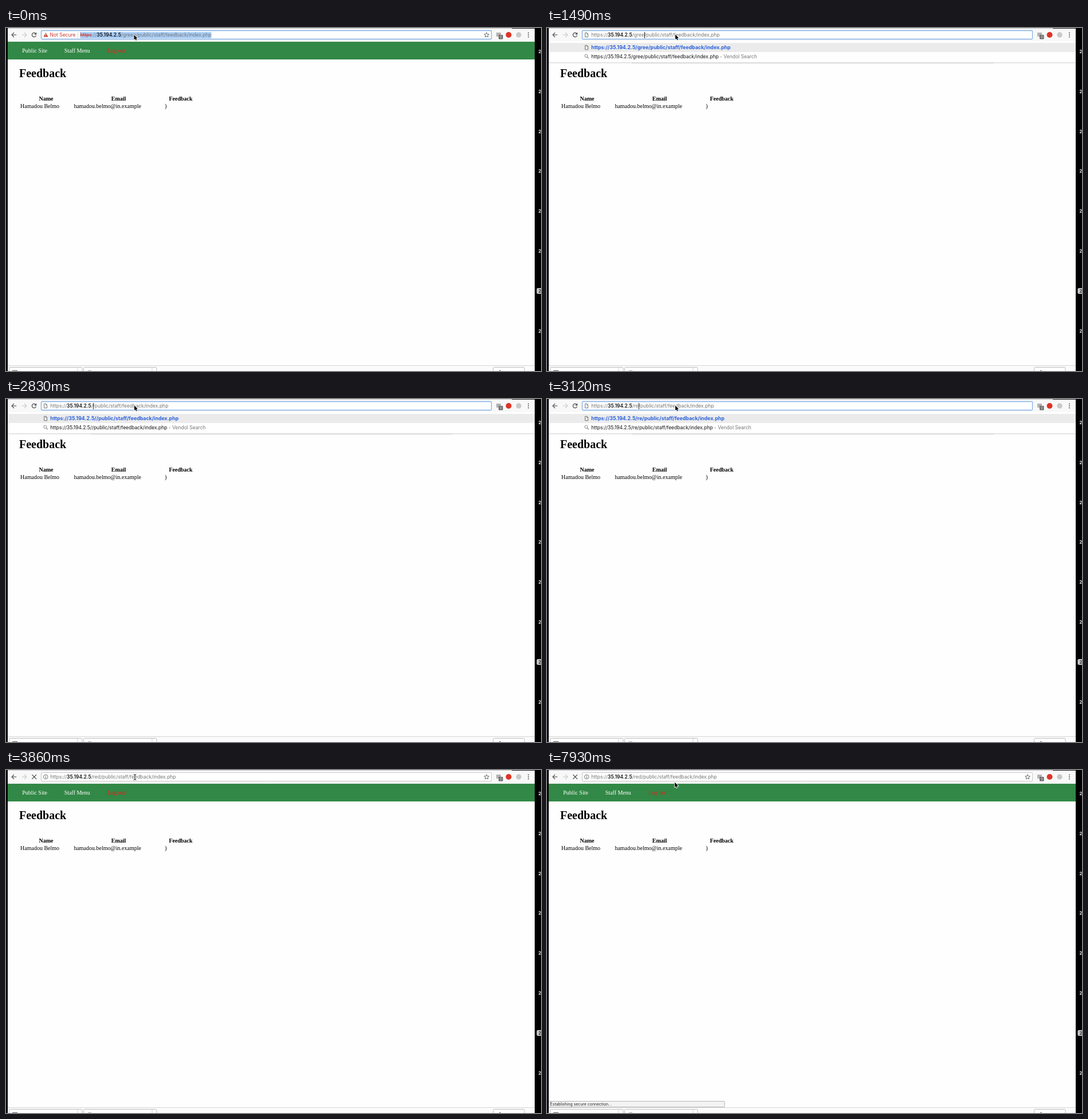
An HTML page with a canvas for the animation above (8000 ms loop, 934 by 600 pixels).

```html
<!DOCTYPE html>
<html lang="en">
<head>
<meta charset="utf-8">
<title>Feedback</title>
<style>
html, body { margin: 0; width: 100%; height: 100%; overflow: hidden; background: #fff; }
canvas { display: block; }
</style>
</head>
<body>
<canvas id="stage" width="934" height="600"></canvas>
<script>
const ctx = document.getElementById('stage').getContext('2d');
const LOOP = 8000;
const UI = 'Inter, "Liberation Sans", sans-serif';
const SERIF = '"Liberation Serif", serif';
const URL_FONT = '8.5px ' + UI;
const HOST_FONT = '600 8.5px ' + UI;
const BOLD_FONT = 'bold 8.8px ' + UI;
const GRAY = '#757575';
const HOST = '35.194.2.5';
const TAIL = '/public/staff/feedback/index.php';

// [start ms, path segment being edited]
const TYPED = [[1490, 'gree'], [1640, 'gre'], [1940, 'gr'], [2380, 'g'], [2830, ''],
  [2970, 'r'], [3120, 're'], [3420, 'red']];

// [start ms, pointer shape, x, y]
const POINTER = [[0, 'arrow', 223.5, 12], [420, 'beam', 225, 7.5], [570, 'beam', 224.5, 7.5],
  [740, 'beam', 225, 7.5], [1340, 'arrow', 224, 11.5], [3710, 'beam', 225, 7.5],
  [4460, 'arrow', 221.5, 10.5], [4600, 'arrow', 221.3, 20.5], [4750, 'arrow', 221, 21.5],
  [7930, 'arrow', 223, 21.5]];

const at = (steps, t) => steps.filter(s => s[0] <= t).pop();

function rect(x, y, w, h, color) {
  ctx.fillStyle = color;
  ctx.fillRect(x, y, w, h);
}

function text(str, x, y, font, color, align = 'left') {
  ctx.font = font;
  ctx.fillStyle = color;
  ctx.textAlign = align;
  ctx.fillText(str, x, y);
  return x + ctx.measureText(str).width;
}

function line(points, color, width = 1, close = false) {
  ctx.beginPath();
  points.forEach(([x, y]) => ctx.lineTo(x, y));
  if (close) ctx.closePath();
  ctx.strokeStyle = color;
  ctx.lineWidth = width;
  ctx.stroke();
}

function box(x, y, w, h, r, fill, stroke, width = 1) {
  ctx.beginPath();
  ctx.roundRect(x, y, w, h, r);
  if (fill) { ctx.fillStyle = fill; ctx.fill(); }
  if (stroke) { ctx.strokeStyle = stroke; ctx.lineWidth = width; ctx.stroke(); }
}

function circle(x, y, r, fill, stroke, width = 1) {
  box(x - r, y - r, 2 * r, 2 * r, r, fill, stroke, width);
}

function page() {
  rect(0, 0, 934, 600, '#fefefe');
  rect(3, 24, 920, 31, '#328846');
  text('Public Site', 28.3, 43, '10px ' + SERIF, '#fff');
  text('Staff Menu', 101.7, 43, '10px ' + SERIF, '#fff');
  text('Log out', 177, 43, '10px ' + SERIF, '#f41c1c');
  text('Feedback', 23, 86, 'bold 20px ' + SERIF, '#000');
  const head = 'bold 10px ' + SERIF;
  text('Name', 70, 126.6, head, '#000', 'center');
  text('Email', 196.5, 126.6, head, '#000', 'center');
  text('Feedback', 305, 126.6, head, '#000', 'center');
  const cell = '10px ' + SERIF;
  text('Hamadou Belmo', 25, 140.2, cell, '#000');
  text('hamadou.belmo@in.example', 118.4, 140.2, cell, '#000');
  text(')', 277.2, 140.2, cell, '#000');
}

function downloads() {
  rect(3, 590, 920, 10, '#fbfbfb');
  rect(3, 590, 920, 1, '#d6d6d6');
  for (const x of [6, 136]) {
    box(x - .5, 593.5, 127.5, 20, 2, '#fff', '#bdbdbd');
    rect(x + 118.5, 594, 1, 6, '#cfcfcf');
  }
  rect(11, 599, 9, 1, '#555');
  rect(143, 599, 6, 1, '#aaa');
  box(850.5, 593.5, 54.5, 20, 2, '#fff', '#bdbdbd');
  rect(861, 599, 3, 1, '#666');
}

function status(alpha) {
  ctx.globalAlpha = alpha;
  box(2.5, 579.5, 307.5, 10, 1, '#f3f3f3', '#b5b5b5');
  text('Establishing secure connection...', 5.6, 587, '6.9px ' + UI, '#222');
  ctx.globalAlpha = 1;
}

function navArrow(x, dir, color) {
  line([[x - 4 * dir, 12], [x + 4.2 * dir, 12]], color, 1.1);
  line([[x, 8], [x - 4 * dir, 12], [x, 16]], color, 1.1);
}

function star(cx, cy) {
  const pts = [...Array(10).keys()].map(i => {
    const a = i * Math.PI / 5 - Math.PI / 2, r = i % 2 ? 2 : 4.5;
    return [cx + r * Math.cos(a), cy + r * Math.sin(a)];
  });
  line(pts, '#5a5a5a', .9, true);
}

function doc(x, y) {
  line([[x, y], [x + 3.2, y], [x + 5, y + 2], [x + 5, y + 7.5], [x, y + 7.5]], '#666', .9, true);
  line([[x + 3, y], [x + 3, y + 2.2], [x + 5, y + 2.2]], '#666', .7);
}

function toolbar(loading) {
  rect(3, 0, 920, 24, '#f8f8f8');
  rect(3, 0, 880, 1, '#c4c4c4');
  rect(883, 0, 40, 1, '#161616');
  navArrow(14, 1, '#4c4c4c');
  navArrow(32, -1, '#cbcbcb');
  if (loading) {
    line([[45.4, 8.2], [53, 15.8]], '#444', 1.2);
    line([[53, 8.2], [45.4, 15.8]], '#444', 1.2);
  } else {
    ctx.beginPath();
    ctx.arc(49, 12, 3.6, .3, 5.5);
    ctx.strokeStyle = '#444';
    ctx.lineWidth = 1.2;
    ctx.stroke();
    ctx.beginPath();
    ctx.moveTo(53.2, 7.6);
    ctx.lineTo(53.2, 11.5);
    ctx.lineTo(49.3, 11.5);
    ctx.fillStyle = '#444';
    ctx.fill();
  }
  box(61.5, 4.5, 786, 15, 1.5, '#fff', loading ? '#c8c8c8' : '#83b1e4', loading ? 1 : 1.3);
  // extension buttons
  rect(856, 8, 8, 7, '#b4b4b4');
  box(860, 12, 7.5, 7.5, 1, '#666');
  text('0', 863.8, 18, '6px ' + UI, '#fff', 'center');
  circle(877.5, 12, 5, '#dc3426');
  circle(895, 12, 4.7, '#c9c9c9');
  for (const y of [8.6, 12, 15.4]) circle(912, y, 1, '#4c4c4c');
}

// Draws host and path, returns the x just after the path segment.
function hostPath(x, path) {
  const end = text(HOST, x, 15.1, HOST_FONT, '#111');
  text(path + TAIL, end, 15.1, URL_FONT, GRAY);
  return end + ctx.measureText(path).width;
}

function address(path) {
  return hostPath(text('https://', 77.2, 15.1, URL_FONT, GRAY), path);
}

function drawCaret(x) {
  rect(Math.round(x), 7, 1, 11, '#222');
}

function insecure(t) {
  ctx.beginPath();
  ctx.moveTo(69.5, 8.2);
  ctx.lineTo(73.5, 15.4);
  ctx.lineTo(65.5, 15.4);
  ctx.fillStyle = '#c8372b';
  ctx.fill();
  rect(69, 10.5, 1, 2.4, '#fff');
  rect(69, 13.6, 1, 1, '#fff');
  text('Not Secure', 76.5, 15.1, URL_FONT, '#c8372b');
  rect(125, 7, 1, 11, '#d6d6d6');
  const x = 129.4;
  if (t < 150) rect(x, 7, 229, 11, '#a9cdf6');
  const mid = text('https', x, 15.1, URL_FONT, '#c8372b');
  line([[x, 12.5], [mid, 12.5]], '#c8372b', .9);
  const caret = hostPath(text('://', mid, 15.1, URL_FONT, GRAY), '/green');
  if (t >= 150 && (t < 570 || t >= 740)) drawCaret(caret);
  star(839, 12.3);
}

function suggestions(word) {
  const url = 'https://' + HOST + '/' + word + TAIL;
  rect(3, 23, 920, 38, '#fff');
  rect(3, 26, 920, 16, '#ebebeb');
  rect(3, 60, 920, 1, '#dedede');
  rect(3, 61, 920, 1, '#ececec');
  rect(148, 61, 632, 1, '#d4d4d4');
  doc(66.6, 30.3);
  let end = text(url, 77.2, 37.2, BOLD_FONT, '#2b62dc');
  if (word === 'red') text(' - Staff: Feedback', end, 37.2, URL_FONT, GRAY);
  circle(68.3, 48.8, 2.5, null, '#777', .9);
  line([[70.1, 50.6], [72.8, 53.3]], '#777', 1.1);
  end = text(url, 77.2, 53, URL_FONT, '#111');
  text(' - Vendol Search', end, 53, URL_FONT, GRAY);
}

function editing(word) {
  doc(66.6, 8.3);
  drawCaret(address('/' + word));
  suggestions(word);
}

function connecting() {
  circle(69.3, 12, 3.8, null, '#666', .9);
  rect(68.8, 11.3, 1, 3, '#555');
  rect(68.8, 9.5, 1, 1, '#555');
  address('/red');
  star(839, 12.3);
}

function sides() {
  rect(0, 0, 3, 600, '#000');
  rect(923, 0, 11, 600, '#000');
  for (let i = 0; i < 8; i++) {
    const y = 41.3 + i * 69.8, on = i === 6;
    if (on) box(926.5, y - 5, 12, 10, 2, '#c9c9c9');
    text('2', 929.6, y + 2.7, 'bold 7.4px ' + UI, on ? '#222' : '#fff');
  }
}

function pointer(shape, x, y) {
  if (shape === 'beam') {
    const h = 10;
    for (const [color, w] of [['#fff', 2.2], ['#111', 1]]) {
      line([[x, y + .5], [x, y + h - .5]], color, w);
      for (const [end, bend] of [[y, y + 1], [y + h, y + h - 1]])
        line([[x - 2.3, end], [x, bend], [x + 2.3, end]], color, w);
    }
    return;
  }
  const pts = [[0, 0], [0, 8.4], [1.9, 6.7], [3.2, 9.7], [4.7, 9.1], [3.4, 6.2], [6, 6.1]]
    .map(([a, b]) => [x + a, y + b]);
  line(pts, '#fff', 1.5, true);
  ctx.fillStyle = '#000';
  ctx.fill();
}

function draw(t) {
  const loading = t >= 3860;
  page();
  downloads();
  toolbar(loading);
  if (loading) connecting();
  else if (t >= 1490) editing(at(TYPED, t)[1]);
  else insecure(t);
  if (t >= 4010) status(t < 4160 ? .5 : 1);
  sides();
  pointer(...at(POINTER, t).slice(1));
}

let start = null;
function tick(now) {
  if (start === null) start = now;
  draw((now - start) % LOOP);
  requestAnimationFrame(tick);
}
requestAnimationFrame(tick);
</script>
</body>
</html>
```
